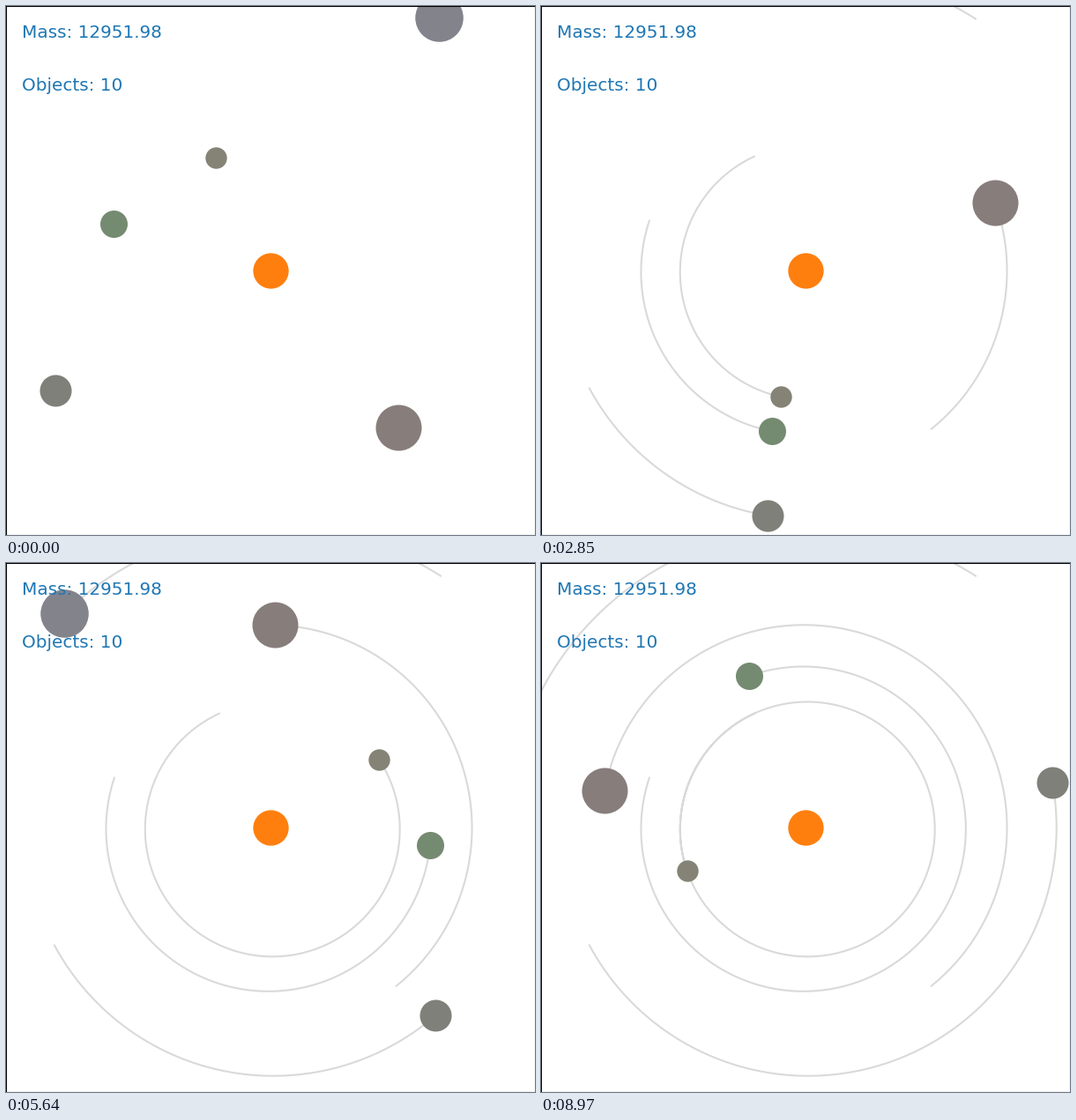
Recreate the animation shown at these times as a matplotlib script. Size 600 by 600 pixels, loop 9 s.

```python
import numpy as np
import matplotlib.pyplot as plt
from matplotlib.animation import FuncAnimation

FRAMES = 300
INTERVAL = 30
DPI = 100

# semi-major axis, eccentricity, periapsis (deg), mean anomaly (deg),
# mean motion (deg per frame), diameter (px), colour
BODIES = [
    (144.5, 0.0205, 139, -22.32, 1.4759, 24.4, "#858375"),
    (184.2, 0.0155, 35, 126.95, 1.0258, 31.0, "#758b71"),
    (230.2, 0.0075, 15, -65.00, 0.7331, 52.0, "#877d7b"),
    (281.75, 0.0105, 180, 28.55, 0.5418, 36.0, "#7f8079"),
    (345.2, 0.0232, 142, -83.00, 0.4008, 54.5, "#83838c"),
]


def orbit(t, a, e, peri, m0, n):
    """Kepler orbit around the origin, small eccentricity."""
    m = np.radians(m0 + n * t)
    nu = m + 2 * e * np.sin(m) + 1.25 * e**2 * np.sin(2 * m)
    r = a * (1 - e**2) / (1 + e * np.cos(nu))
    theta = nu + np.radians(peri)
    return r * np.cos(theta), r * np.sin(theta)


def disc(x, y, size, color):
    return ax.plot([x], [y], "o", ms=size * 72 / DPI, mew=0, color=color)[0]


fig = plt.figure(figsize=(6, 6), dpi=DPI)
ax = fig.add_axes([0, 0, 1, 1])
ax.set(xlim=(-300, 300), ylim=(-300, 300), xticks=[], yticks=[])

for y, label in ((0.94, "Mass: 12951.98"), (0.84, "Objects: 10")):
    ax.text(0.03, y, label, transform=ax.transAxes, fontsize=14.4,
            family="DejaVu Sans", color="#1f77b4")

# trails begin one step before the first picture
steps = np.arange(-1, FRAMES)
paths = [orbit(steps, *body[:5]) for body in BODIES]
trails = [ax.plot([], [], color="k", alpha=0.15, lw=1.5)[0] for _ in BODIES]
disc(0, 0, 40.3, "#ff7f0e")
planets = [disc(0, 0, size, color) for *_, size, color in BODIES]


def update(i):
    for (x, y), trail, planet in zip(paths, trails, planets):
        trail.set_data(x[:i + 2], y[:i + 2])
        planet.set_data([x[i + 1]], [y[i + 1]])
    return trails + planets


anim = FuncAnimation(fig, update, frames=FRAMES, interval=INTERVAL,
                     repeat=True, repeat_delay=0, blit=False)
plt.show()
```
